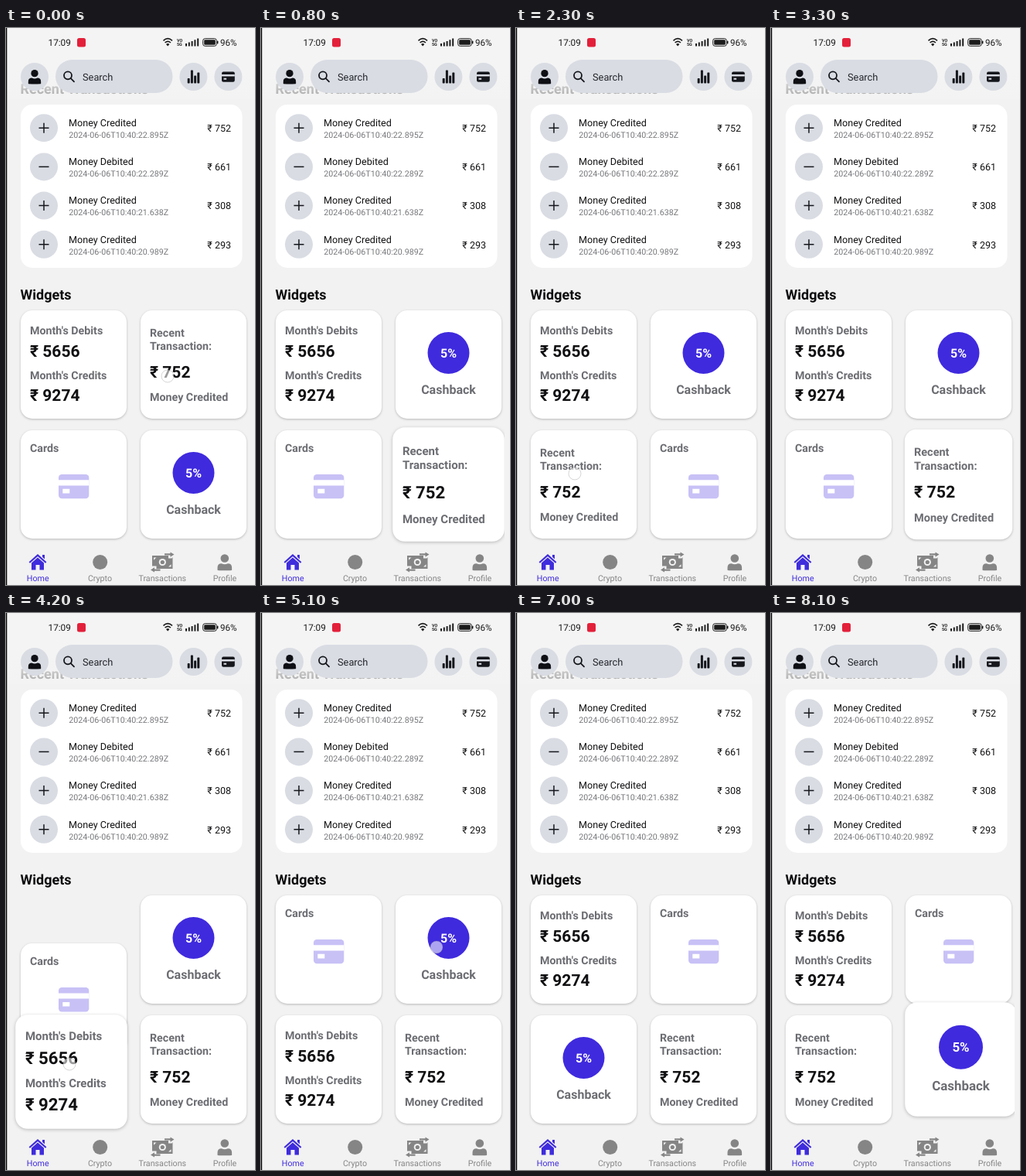
Recreate the animation shown at these times as an HTML page. Size 322 by 720 pixels, loop 8.2 s.

```html
<!DOCTYPE html>
<html lang="en">
<head>
<meta charset="utf-8">
<title>Wallet widgets</title>
<style>
  html, body { margin: 0; width: 100%; height: 100%; overflow: hidden; background: #f2f2f2; }
  svg { display: block; width: 100%; height: 100%; font-family: Roboto, "Noto Sans", sans-serif; text-rendering: geometricPrecision; }
  .bold { font-weight: 700; }
  .label { font-weight: 700; font-size: 14.25px; fill: #6c6d72; }
  .sum { font-weight: 700; font-size: 21px; fill: #101012; }
  .chip { fill: #d9dce3; }
  .panel { fill: #fff; filter: drop-shadow(0 1.5px 1.8px rgba(0, 0, 0, .24)); }
  .tab { font-size: 10.7px; text-anchor: middle; }
</style>
</head>
<body>
<svg viewBox="0 0 322 720">
  <defs>
    <linearGradient id="veil" x1="0" y1="0" x2="0" y2="1">
      <stop offset=".6" stop-color="#f4f4f4"/>
      <stop offset="1" stop-color="#f4f4f4" stop-opacity=".5"/>
    </linearGradient>
    <clipPath id="view"><path d="M5 330H315V672H5z"/></clipPath>
    <g id="person">
      <circle cy="-4.6" r="4.9"/>
      <path d="M-8.6 9.5V6.5Q-8.6 1.6-3.8 1.6Q0 3.4 3.8 1.6Q8.6 1.6 8.6 6.5V9.5Q8.6 10-.1 10T-8.6 9.5z"/>
    </g>
  </defs>
  <rect width="322" height="720" fill="#f2f2f2"/>

  <text class="bold" x="18.5" y="85" font-size="18" fill="#555">Recent Transactions</text>
  <rect width="322" height="92" fill="url(#veil)"/>

  <!-- status bar -->
  <g fill="#1b1b1b" font-size="12">
    <text x="54.5" y="23" font-size="11.8">17:09</text>
    <rect x="92" y="13" width="11" height="11.5" rx="2.5" fill="#e3203a"/>
    <g fill="none" stroke="#1b1b1b" stroke-width="1.6">
      <path d="M203.5 16.4Q209.2 11 215 16.4M205.6 19Q209.2 15.6 213 19"/>
    </g>
    <path d="M207 21Q209.2 19 211.4 21L209.2 23.6z"/>
    <g class="bold" font-size="5.4"><text x="221" y="18">VO</text><text x="221" y="23.3">5G</text></g>
    <path d="M232 20h2v3.5h-2zM235.8 18.6h2v4.9h-2zM239.6 17h2v6.5h-2zM243.4 15.2h2v8.3h-2zM247.2 13.4h2v10.1h-2z"/>
    <rect x="254.7" y="13.7" width="17.6" height="9.6" rx="2.6" fill="none" stroke="#1b1b1b"/>
    <rect x="256.2" y="15.2" width="14.6" height="6.6" rx="1.3"/>
    <rect x="273" y="16.5" width="1.4" height="4" rx=".7"/>
    <text x="277" y="23" font-size="11.6">96%</text>
  </g>

  <!-- header -->
  <g class="chip">
    <circle cx="37" cy="63" r="18"/>
    <rect x="64" y="41" width="151.5" height="43" rx="21.5"/>
    <circle cx="242.4" cy="63" r="18"/>
    <circle cx="287.4" cy="63" r="18"/>
  </g>
  <use href="#person" transform="translate(37 63) scale(.95)" fill="#0d0f14"/>
  <g fill="none" stroke="#15171c" stroke-width="1.8" stroke-linecap="round">
    <circle cx="80" cy="61.3" r="5"/><path d="M83.8 65.2L88 69.4"/>
  </g>
  <text x="99" y="67.5" font-size="12.8" fill="#25272c">Search</text>
  <g fill="#15171c">
    <rect x="234.7" y="65" width="3" height="6.5" rx=".8"/>
    <rect x="238.9" y="54.6" width="3" height="16.9" rx=".8"/>
    <rect x="243.1" y="61.6" width="3" height="9.9" rx=".8"/>
    <rect x="247.3" y="57.6" width="3" height="13.9" rx=".8"/>
    <rect x="279" y="56.5" width="16.8" height="13.2" rx="2.2"/>
  </g>
  <path class="chip" d="M279 60h16.8v2.4H279zM281.5 64.8h3.6v2h-3.6z"/>

  <rect x="19" y="99" width="286.5" height="211" rx="15" fill="#fff"/>
  <g id="rows"></g>
  <text class="bold" x="18.5" y="350.7" font-size="18" fill="#0c0c0e">Widgets</text>

  <g clip-path="url(#view)"><g id="grid">
    <g id="month">
      <rect class="panel" width="137" height="140" rx="15"/>
      <text class="label" x="12" y="31.3">Month's Debits</text>
      <text class="sum" x="12" y="60.4">₹ 5656</text>
      <text class="label" x="12" y="88.5">Month's Credits</text>
      <text class="sum" x="12" y="117.3">₹ 9274</text>
    </g>
    <g id="recent">
      <rect class="panel" width="137" height="140" rx="15"/>
      <text class="label" x="12" y="34">Recent</text>
      <text class="label" x="12" y="51">Transaction:</text>
      <text class="sum" x="12" y="86.7">₹ 752</text>
      <text class="label" x="12" y="117.2">Money Credited</text>
    </g>
    <g id="cards">
      <rect class="panel" width="137" height="140" rx="15"/>
      <text class="label" x="12" y="28">Cards</text>
      <rect x="49" y="57" width="39.3" height="31.3" rx="4.2" fill="#c8c1f6"/>
      <path d="M49 64.3h39.3v7.2H49zM54.3 75.8h9v5.6h-9z" fill="#fff"/>
    </g>
    <g id="cash">
      <rect class="panel" width="137" height="140" rx="15"/>
      <circle cx="68.5" cy="55" r="27" fill="#3f2ade"/>
      <text class="bold" x="68.5" y="60.7" font-size="16" fill="#fff" text-anchor="middle">5%</text>
      <text class="label" x="68.5" y="107.6" style="font-size:16px" text-anchor="middle">Cashback</text>
    </g>
  </g></g>
  <circle id="touch" r="8" fill="#fff" fill-opacity=".58" stroke="#777" stroke-opacity=".3"/>

  <!-- tab bar -->
  <g fill="#3f2cdc">
    <path d="M41 680L52.4 690.2 51 691.8 41 683 31 691.8 29.6 690.2zM47 681h3v5.4l-3-2.7z"/>
    <path d="M41 684.6L49 691.6V700.5H43.5V694H38.5V700.5H33V691.6z"/>
    <text class="tab" x="41.2" y="714.8">Home</text>
  </g>
  <g fill="#858585">
    <circle cx="121.7" cy="690.5" r="9.5"/>
    <text class="tab" x="121.5" y="714.8">Crypto</text>
    <path d="M189 682H210V685.5H214.5Q215.5 684 215.5 684V699H194.5V695.5H189z"/>
    <path d="M205 679.2H212.5V677.4L217.5 680.6 212.5 683.8V681.6H205zM199.5 701.8H192V703.6L187 700.4 192 697.2V699.4H199.5z"/>
    <circle cx="202.3" cy="690.5" r="4.6" fill="#f2f2f2"/>
    <circle cx="202.3" cy="690.5" r="2.6"/>
    <path d="M191 684.5h3.4l-3.4 3.2zM213.5 696.5h-3.4l3.4-3.2z" fill="#f2f2f2"/>
    <text class="tab" x="202.3" y="714.8">Transactions</text>
    <use href="#person" transform="translate(282.8 690.5) scale(1.08)"/>
    <text class="tab" x="283" y="714.8">Profile</text>
  </g>
  <rect width="1.3" height="720" fill="#0a0a0a"/>
</svg>
<script>
const LOOP = 8200, STEP = 100, SETTLE = 300, SWAP = 300, GROW = .055;
const $ = id => document.getElementById(id);
const clamp = v => Math.max(0, Math.min(1, v));
const smooth = v => { v = clamp(v); return v * v * (3 - 2 * v); };
const mix = (a, b, k) => a.map((v, i) => v + (b[i] - v) * k);

const rows = [
  ['Credited', '22.895', 752], ['Debited', '22.289', 661],
  ['Credited', '21.638', 308], ['Credited', '20.989', 293]
];
$('rows').innerHTML = rows.map(([kind, sec, sum], i) => `
  <g transform="translate(0 ${i * 50.2})">
    <circle class="chip" cx="49" cy="129.2" r="18"/>
    <path d="M42.5 129.2h13${kind === 'Credited' ? 'M49 122.7v13' : ''}" stroke="#15171c" stroke-width="1.5"/>
    <text x="81" y="127" font-size="12.6" fill="#121214">Money ${kind}</text>
    <text x="81.3" y="142" font-size="10.7" fill="#77787c">2024-06-06T10:40:${sec}Z</text>
    <text x="291" y="134" font-size="12.5" fill="#121214" text-anchor="end">₹ ${sum}</text>
  </g>`).join('');

const slots = { A: [19, 365], B: [174, 365], C: [19, 520], D: [174, 520] };
const home = { month: 'A', recent: 'B', cards: 'C', cash: 'D' };

// grab: finger inside the card; drop: offset from the slot on release
const drags = [
  { card: 'recent', other: 'cash', from: 'B', to: 'D', grab: [35, 85], drop: [0, 0], down: 0, move: [200, 600], swap: 400, up: 800 },
  { card: 'recent', other: 'cards', from: 'D', to: 'C', grab: [60, 66], drop: [4, -3], down: 1000, move: [1200, 1500], swap: 1350, up: 1600 },
  { card: 'recent', other: 'cards', from: 'C', to: 'D', grab: [57, 56], drop: [0, 0], down: 2200, move: [2500, 2900], swap: 2700, up: 3100 },
  { card: 'month', other: 'cards', from: 'A', to: 'C', grab: [66, 60], drop: [-3, 3], down: 3600, move: [3850, 4200], swap: 4030, up: 4300 },
  { card: 'cash', other: 'cards', from: 'B', to: 'A', grab: [53, 67], drop: [0, 0], down: 5000, move: [5200, 5400], swap: 5300, up: 5450 },
  { card: 'month', other: 'cash', from: 'C', to: 'A', grab: [64.5, 48.5], drop: [4.5, 6.5], down: 5600, move: [5800, 6100], swap: 6030, up: 6300 },
  { card: 'cash', other: 'recent', from: 'C', to: 'D', grab: [66, 60], drop: [3, -13], down: 7050, move: [7300, 7750], swap: 7500, up: 8100 }
];

let front = '';
function draw(t) {
  const pos = {}, size = {};
  for (const c in home) { pos[c] = slots[home[c]]; size[c] = 1; }
  let top = 'recent', finger = null;

  for (const d of drags) {
    if (t < d.down) break;
    const a = slots[d.from], b = slots[d.to];
    const rest = 1 - clamp((t - d.up) / SETTLE);
    const end = b.map((v, i) => v + d.drop[i] * rest);
    pos[d.card] = mix(a, end, smooth((t - d.move[0]) / (d.move[1] - d.move[0])));
    pos[d.other] = mix(b, a, smooth((t - d.swap) / SWAP));
    size[d.card] = 1 + GROW * clamp((t - d.move[0] + 100) / 200) * rest;
    top = d.card;
    finger = t < d.up ? pos[d.card].map((v, i) => v + d.grab[i]) : null;
  }

  for (const c in home) {
    const [x, y] = pos[c];
    $(c).setAttribute('transform', `translate(${x + 68.5} ${y + 70}) scale(${size[c]}) translate(-68.5 -70)`);
  }
  if (top !== front) $('grid').append($(front = top));
  $('touch').style.display = finger ? '' : 'none';
  if (finger) $('touch').setAttribute('transform', `translate(${finger})`);
}

const begin = performance.now();
function tick() {
  const t = (performance.now() - begin) % LOOP;
  draw(Math.floor(t / STEP) * STEP);
  requestAnimationFrame(tick);
}
tick();
</script>
</body>
</html>
```
